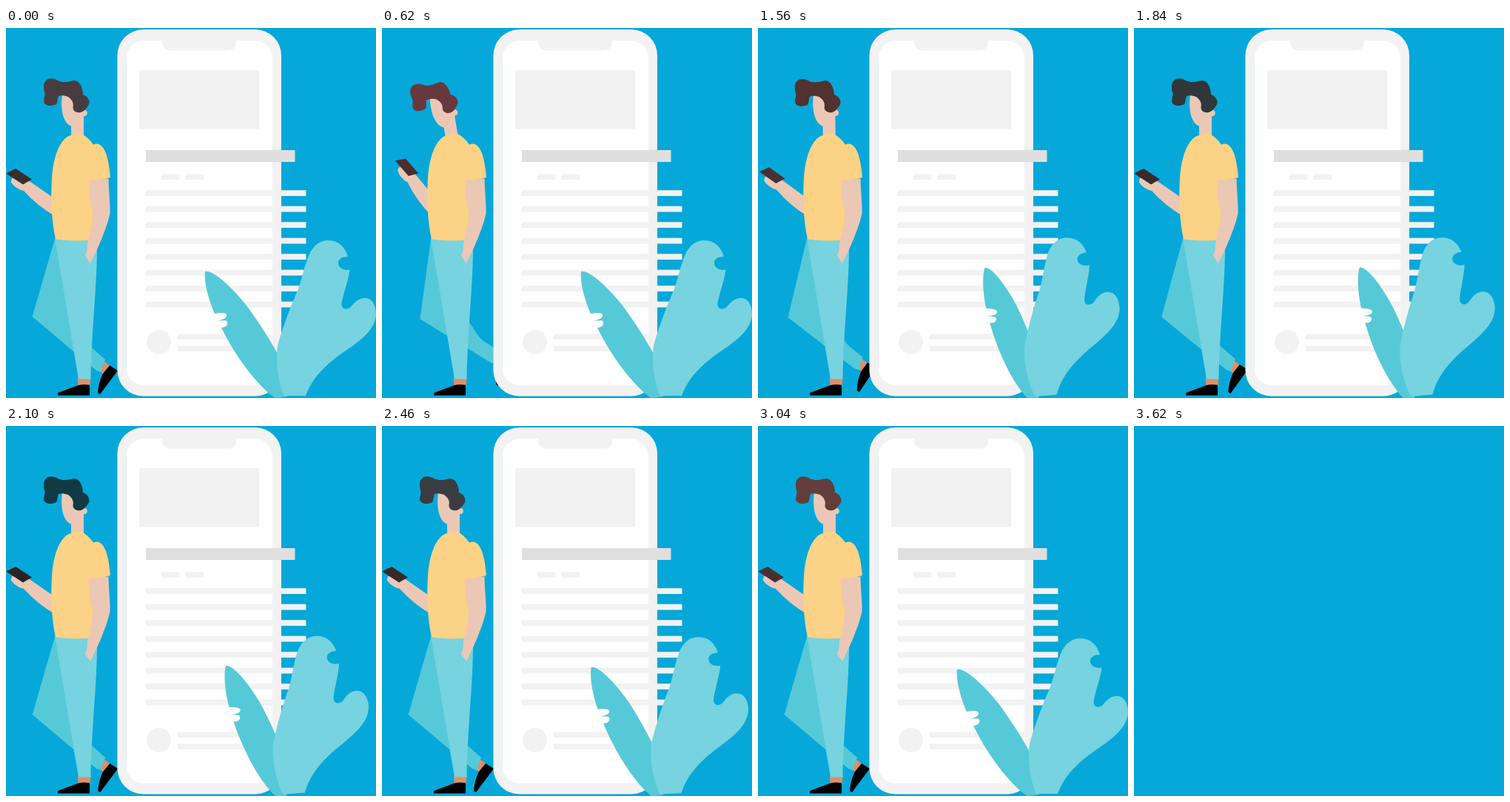
Write an HTML page that moves like this. It is 500 px wide and 500 px high and loops after 3640 ms.

```html
<!DOCTYPE html>
<html lang="en">
<head>
<meta charset="utf-8">
<title>Reader with phone</title>
<style>
html, body { margin: 0; width: 100%; height: 100%; overflow: hidden; background: #06a8d9; }
svg { display: block; width: 100%; height: 100%; }
.skin { fill: #ebc8b6; }
.ankle { fill: #e08f66; }
.grey { fill: #f2f2f2; }
.deep { fill: #56c9d8; }
.pale { fill: #76d3df; }
.shirt { fill: #fcd286; }
</style>
</head>
<body>
<svg viewBox="0 0 500 500">
  <g id="scene">
    <g id="backLeg">
      <path class="ankle" d="M132 450L141 457L132 468L125 463Z"/>
      <path d="M140 456L151 463L127 495L124 493Q125 479 131 467Z"/>
      <path class="deep" d="M66 285L35.5 390L122 463L128 465L134 448L118 434Q113 430 110 424L101 405Z"/>
    </g>

    <rect class="grey" x="150.5" y="2" width="221.5" height="495.500" rx="35"/>
    <rect x="162.500" y="17" width="197.500" height="466" rx="24" fill="#fefefe"/>
    <path d="M162.500 40V460" stroke="#d9f1f5" fill="none"/>
    <path class="grey" d="M211 16H311V18Q311 30.500 298 30.500H224Q211 30.500 211 18Z"/>
    <rect class="grey" x="180" y="57" width="162" height="79.500"/>
    <g id="lines" class="grey">
      <rect x="209.500" y="197.500" width="25" height="7.500"/>
      <rect x="242" y="197.500" width="25" height="7.500"/>
      <rect x="232" y="413.500" width="135" height="7.500"/>
      <rect x="232" y="429.500" width="135" height="7.500"/>
      <circle cx="206.500" cy="424.500" r="16.500"/>
    </g>
    <rect x="189" y="165" width="201.500" height="16" fill="#dfdfdf"/>

    <g id="arm">
      <path class="skin" d="M75 237L36 210Q24 201 12 201Q6 203 7 209Q14 218 24 220Q43 241 66 254Z"/>
      <path id="device" d="M0 196.500L13 190L35 204.500L23 211.500Z"/>
    </g>
    <g id="head">
      <path class="skin" d="M76 90C73 112 78 129 88 132.500V152H105V119A4.200 4.200 0 1 0 104 111L98 90Z"/>
      <path id="hair" d="M51 78C52 68 62 66 70 71C78 75 86 72 92 71C100 71 104 82 104 90C110 92 113 97 112.500 102C111 106 108 109 105 112C98 117 90 113 90.500 107C92 100 88 96 84 93C79 91 73 91 71 92C69 96 70 101 68 103C62 106 54 106 51.500 101C50 95 54 90 52 87C51 84 51 81 51 78Z"/>
    </g>

    <path class="ankle" d="M97 473H114.500L113.500 484H97.500Z"/>
    <path d="M70 496.500V493L97 483Q105 481 113 482.500V496.500Z"/>
    <path class="pale" d="M66 284L98 474.500H114.500C116 400 123 350 123 297L115 284Z"/>
    <path class="shirt" d="M88 145Q96 141 104 144Q112 149 118 157.500C129 153 138 164 141 202L126 206L118 240L116 286.500Q91 289 67 285.500C62 262 60 235 62 203C64 172 74 148 88 145Z"/>
    <path class="skin" d="M112 206.500L138.500 203.500C139 225 141 238 140.500 251C137 266 130 284 124 297L114 318L107 308Q110 303 110 291C113 275 118 264 117 247C113 236 112 220 112 206.500Z"/>

    <path id="leaf" class="deep" d="M269 329C278 327 300 344 325 375C345 402 362 430 369 444L380 498L364 500C345 488 313 450 291 405C297 405 300 401 299 397C297 394 291 396 286 396C293 394 299 392 298 387C295 384 288 385 282 386C274 368 267 342 269 329Z"/>
    <path id="bush" class="pale" d="M376 497C368 480 364 450 367 430C372 410 385 375 394 355C400 340 403 322 409 308C415 293 425 287 435 287C450 287 458 296 462 309C452 309 448 314 449 319C450 325 458 328 464.500 326.500C463 340 457 355 453.500 372C453 380 460 382 466 377C472 369 478 364.500 486 365C496 366 500 376 500 387C499 405 485 418 465 432C435 452 415 470 405 497Z"/>
  </g>
</svg>
<script>
const LOOP = 3640, BLANK = 3620, STEP = 20;
const el = id => document.getElementById(id);

for (let i = 0; i < 8; i++) {
  const bar = document.createElementNS('http://www.w3.org/2000/svg', 'rect');
  const box = { x: 189, y: 219.2 + 21.5 * i, width: 216.5, height: 7.8 };
  for (const key in box) bar.setAttribute(key, box[key]);
  el('lines').append(bar);
}

const smooth = u => u * u * (3 - 2 * u);
const linear = u => u;

// Value at time t along [time, value] keys
function track(keys, t, ease = smooth) {
  const i = keys.findIndex(k => k[0] > t);
  if (i < 0) return keys[keys.length - 1][1];
  if (i === 0) return keys[0][1];
  const [t0, a] = keys[i - 1], [t1, b] = keys[i];
  return a + (b - a) * ease((t - t0) / (t1 - t0));
}

function turn(id, x, y, angle, scale = 1) {
  el(id).setAttribute('transform',
    `translate(${x} ${y}) rotate(${angle}) scale(${scale}) translate(${-x} ${-y})`);
}

const motion = {
  head: [[0, 0], [540, -9.5], [1000, -9.5], [1690, 0]],
  arm: [[0, 0], [540, 15.7], [1220, 15.7], [1650, 0]],
  leg: [[0, 0], [500, -8.7], [2180, 0]],
  bush: [[1000, 0], [1700, -5.6], [3040, 0]],
  leaf: [[620, 0], [1160, -7.4], [1600, 11.4], [3040, 0]],
  leafSize: [[620, 1], [1160, 0.885], [1600, 0.948], [3040, 1]]
};

const shadeTimes = [0, 620, 1220, 1560, 2100, 2820];
const shades = {
  hair: ['473d40', '67393e', '66393e', '50322f', '123a45', '633d3c'],
  device: ['3a2d2d', '4c2e30', '4a2f33', '4a3030', '2a2224', '4a2f31']
};

function shade(id, t) {
  const rgb = [0, 2, 4].map(p => Math.round(track(
    shades[id].map((hex, i) => [shadeTimes[i], parseInt(hex.slice(p, p + 2), 16)]), t, linear)));
  el(id).setAttribute('fill', `rgb(${rgb})`);
}

function draw(t) {
  el('scene').style.display = t >= BLANK ? 'none' : '';
  turn('head', 98, 160, track(motion.head, t));
  turn('arm', 71.4, 252, track(motion.arm, t));
  turn('backLeg', 66, 285, track(motion.leg, t));
  turn('bush', 386, 512, track(motion.bush, t));
  turn('leaf', 365, 500, track(motion.leaf, t), track(motion.leafSize, t));
  shade('hair', t);
  shade('device', t);
}

const start = performance.now();
function tick() {
  const t = (performance.now() - start) % LOOP;
  draw(Math.floor(t / STEP) * STEP);
  requestAnimationFrame(tick);
}
tick();
</script>
</body>
</html>
```
